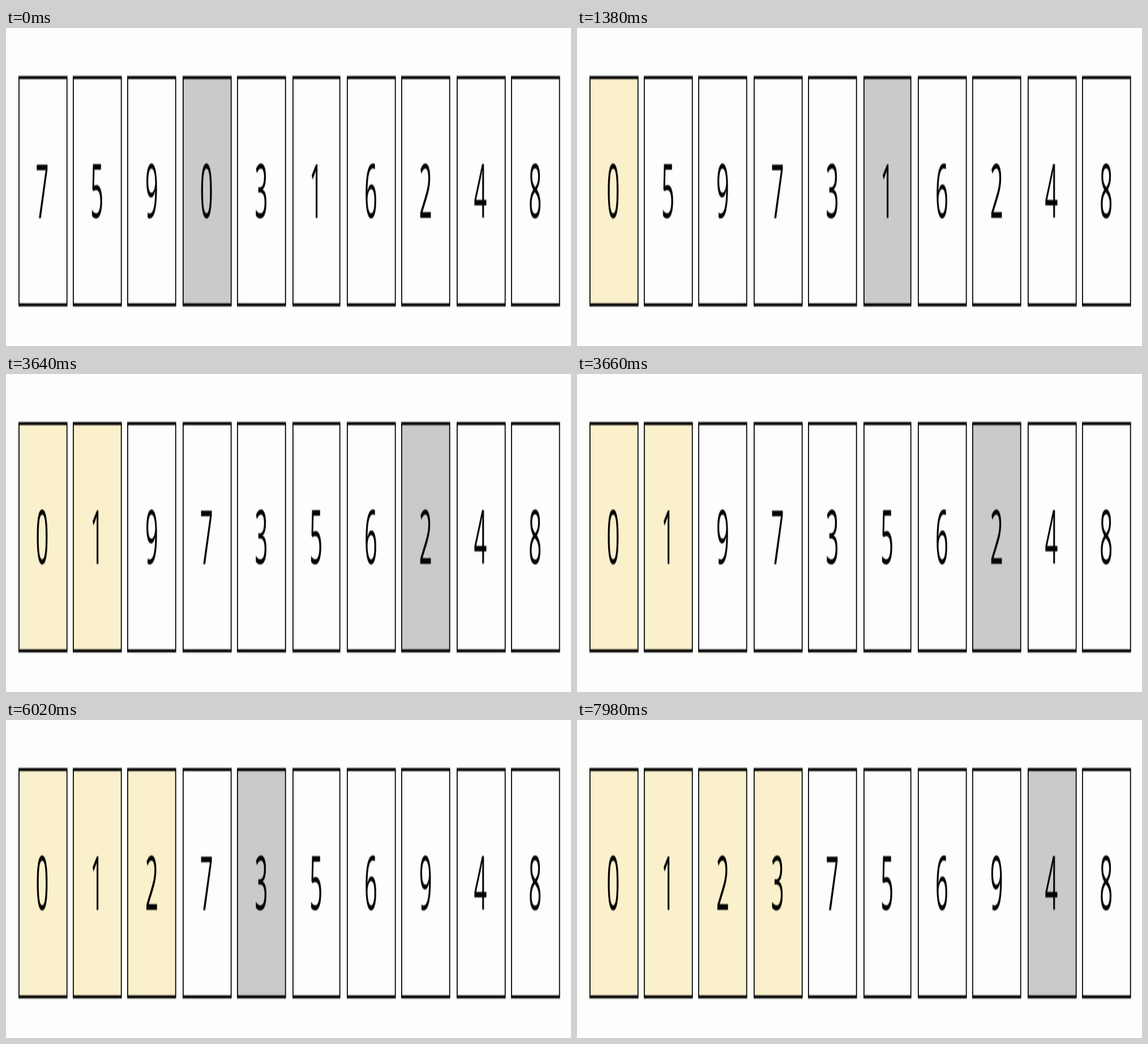
Animation, 998 px wide and 561 px high, one loop 8 s. Source, as an HTML page:

```html
<!DOCTYPE html>
<html lang="en">
<head>
<meta charset="utf-8">
<title>Selection sort</title>
<style>
  html, body { margin: 0; width: 100%; height: 100%; overflow: hidden; background: #fdfdfc; }
  svg { display: block; width: 998px; height: 561px; }
  text { font: 40px "Open Sans", "Noto Sans", sans-serif; text-anchor: middle; fill: #050505; }
</style>
</head>
<body>
<svg viewBox="0 0 998 561">
  <filter id="soft" filterUnits="userSpaceOnUse" x="0" y="0" width="998" height="561"
          color-interpolation-filters="sRGB">
    <feGaussianBlur stdDeviation="0.4 0.9"/>
  </filter>
  <g id="stage" filter="url(#soft)"></g>
</svg>
<script>
const LOOP = 8000, FIRST_SWAP = 1320, SWAP_EVERY = 2210;
const START = [7, 5, 9, 0, 3, 1, 6, 2, 4, 8];
const PLAIN = "#fdfdfc", SORTED = "#fbf0cc", MINIMUM = "#cbc9cb";
const PITCH = 96.75, STRETCH = 3.28, LINE = 1.8;
const stage = document.getElementById("stage");

function add(tag, attrs) {
  const el = document.createElementNS("http://www.w3.org/2000/svg", tag);
  for (const key in attrs) el.setAttribute(key, attrs[key]);
  return stage.appendChild(el);
}

// Card edges sit on a two-pixel grid.
const snap = x => 2 * Math.floor(x / 2);

const cards = START.map((_, i) => {
  const edge = 22.3 + i * PITCH;
  const x = snap(edge), width = snap(edge + 85.9) + 0.6 - x;
  add("rect", { x, y: 84.7, width, height: 406.5, fill: "#050505" });
  const face = add("rect", { x: x + LINE, y: 90.2, width: width - 2 * LINE, height: 395.5 });
  const label = add("text", {
    transform: `translate(${64 + i * PITCH} 335) scale(1 ${STRETCH})`
  });
  return { face, label };
});

// The list after a number of selection steps, with the next minimum's place.
function sortSteps(count) {
  const list = [...START];
  const findMin = from => list.indexOf(Math.min(...list.slice(from)));
  for (let i = 0; i < count; i++) {
    const m = findMin(i);
    [list[i], list[m]] = [list[m], list[i]];
  }
  return { list, min: findMin(count) };
}

let shown = -1;
function draw(now) {
  const t = now % LOOP;
  const done = Math.max(0, Math.floor((t - FIRST_SWAP) / SWAP_EVERY) + 1);
  if (done !== shown) {
    shown = done;
    const { list, min } = sortSteps(done);
    cards.forEach(({ face, label }, i) => {
      face.setAttribute("fill", i < done ? SORTED : i === min ? MINIMUM : PLAIN);
      label.textContent = list[i];
    });
  }
}

const begin = performance.now();
function tick() {
  draw(performance.now() - begin);
  requestAnimationFrame(tick);
}
tick();
</script>
</body>
</html>
```
